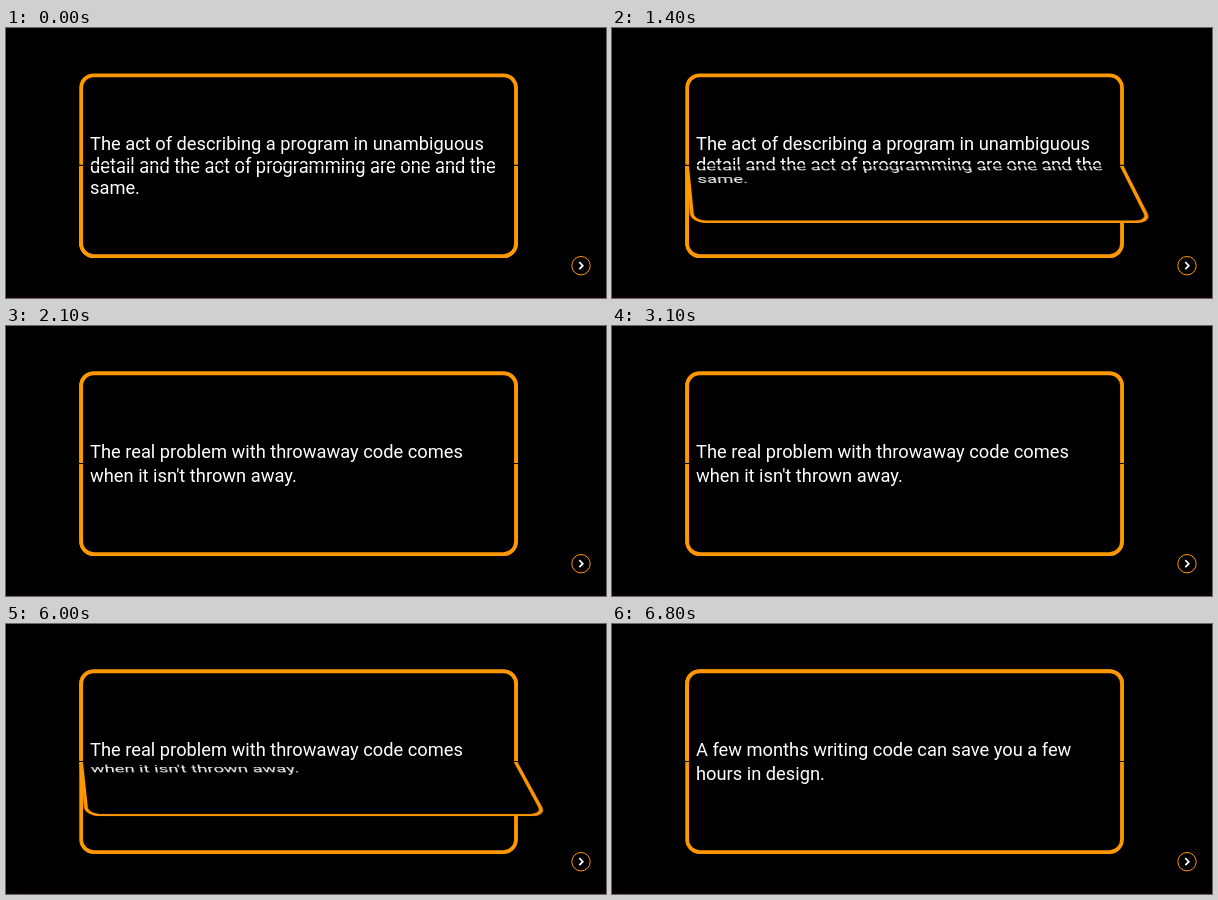
Write an HTML page that moves like this. It is 600 by 270 pixels and loops after 8000 ms.

```html
<!DOCTYPE html>
<html lang="en">
<head>
<meta charset="utf-8">
<title>Flip quotes</title>
<style>
  html, body { margin: 0; width: 100%; height: 100%; overflow: hidden; background: #000; }
  #stage { position: relative; width: 600px; height: 270px; overflow: hidden; background: #000; }
  #stage svg { position: absolute; left: 0; top: 0; width: 600px; height: 270px; display: block; }
  text { font: 18.3px Roboto, sans-serif; fill: #fff; }
  .frame { fill: #000; stroke: #ff9800; stroke-width: 3.8; }
  .floor { position: absolute; left: 0; bottom: 0; width: 100%; height: 2px; background: #0d0006; }

  /* Each card is cut at the hinge; halves turn around it. */
  .upper { clip-path: inset(0 0 133.3px 0); transform-origin: 35px 136.7px; }
  .lower { clip-path: inset(138.7px 0 0 0); transform-origin: -30px 138.7px; }

  .lower.c0 { animation: fold1 8s linear infinite; }
  .upper.c1 { animation: open1 8s linear infinite; }
  .lower.c1 { animation: fold2 8s linear infinite; }
  .upper.c2 { animation: open2 8s linear infinite; }

  @keyframes fold1 {
    0%, 13.75% { transform: perspective(1480px) rotateX(0deg); }
    20%, 100% { transform: perspective(1480px) rotateX(90deg); }
  }
  @keyframes open1 {
    0%, 20% { transform: perspective(1480px) rotateX(-90deg); }
    26.25%, 100% { transform: perspective(1480px) rotateX(0deg); }
  }
  @keyframes fold2 {
    0%, 70.875% { transform: perspective(1480px) rotateX(0deg); }
    77.5%, 100% { transform: perspective(1480px) rotateX(90deg); }
  }
  @keyframes open2 {
    0%, 77.5% { transform: perspective(1480px) rotateX(-90deg); }
    83.75%, 100% { transform: perspective(1480px) rotateX(0deg); }
  }

  .ripple { fill: #444; opacity: 0; animation: press 8s linear infinite; }
  @keyframes press {
    0%, 13.875% { opacity: 0; }
    14.375%, 15% { opacity: 1; }
    17.25%, 70.625% { opacity: 0; }
    71.125%, 71.5% { opacity: 1; }
    73.75%, 100% { opacity: 0; }
  }
</style>
</head>
<body>
<div id="stage">
  <div class="floor"></div>
  <div id="cards"></div>
  <svg viewBox="0 0 600 270" fill="none">
    <circle class="ripple" cx="575" cy="237.7" r="20.3"/>
    <circle cx="575" cy="237.7" r="9.2" stroke="#ff9800"/>
    <path d="M573.3 234.2l3.5 3.5-3.5 3.5" stroke="#fff" stroke-width="1.7"/>
  </svg>
</div>
<script>
  const quotes = [
    ["The act of describing a program in unambiguous",
     "detail and the act of programming are one and the", "same."],
    ["The real problem with throwaway code comes", "when it isn't thrown away."],
    ["A few months writing code can save you a few", "hours in design."]
  ];
  const HINGE = 136.7, GAP = 2, LINE = 21.45, ASCENT = 17;

  function half(side, index) {
    const lines = quotes[index];
    const top = HINGE - lines.length * LINE / 2 + ASCENT;
    const text = lines.map((s, i) => `<text x="84" y="${top + i * LINE}">${s}</text>`).join("");
    const shift = side === "lower" ? GAP : 0;
    return `<svg class="${side} c${index}" viewBox="0 0 600 270"><g transform="translate(0 ${shift})">
      <rect class="frame" x="75.2" y="47.3" width="434.8" height="178.8" rx="12.5"/>${text}</g></svg>`;
  }

  // New upper halves land on top; old lower halves lift off the new ones.
  document.getElementById("cards").innerHTML =
    [0, 1, 2].map(i => half("upper", i)).join("") +
    [2, 1, 0].map(i => half("lower", i)).join("");
</script>
</body>
</html>
```
